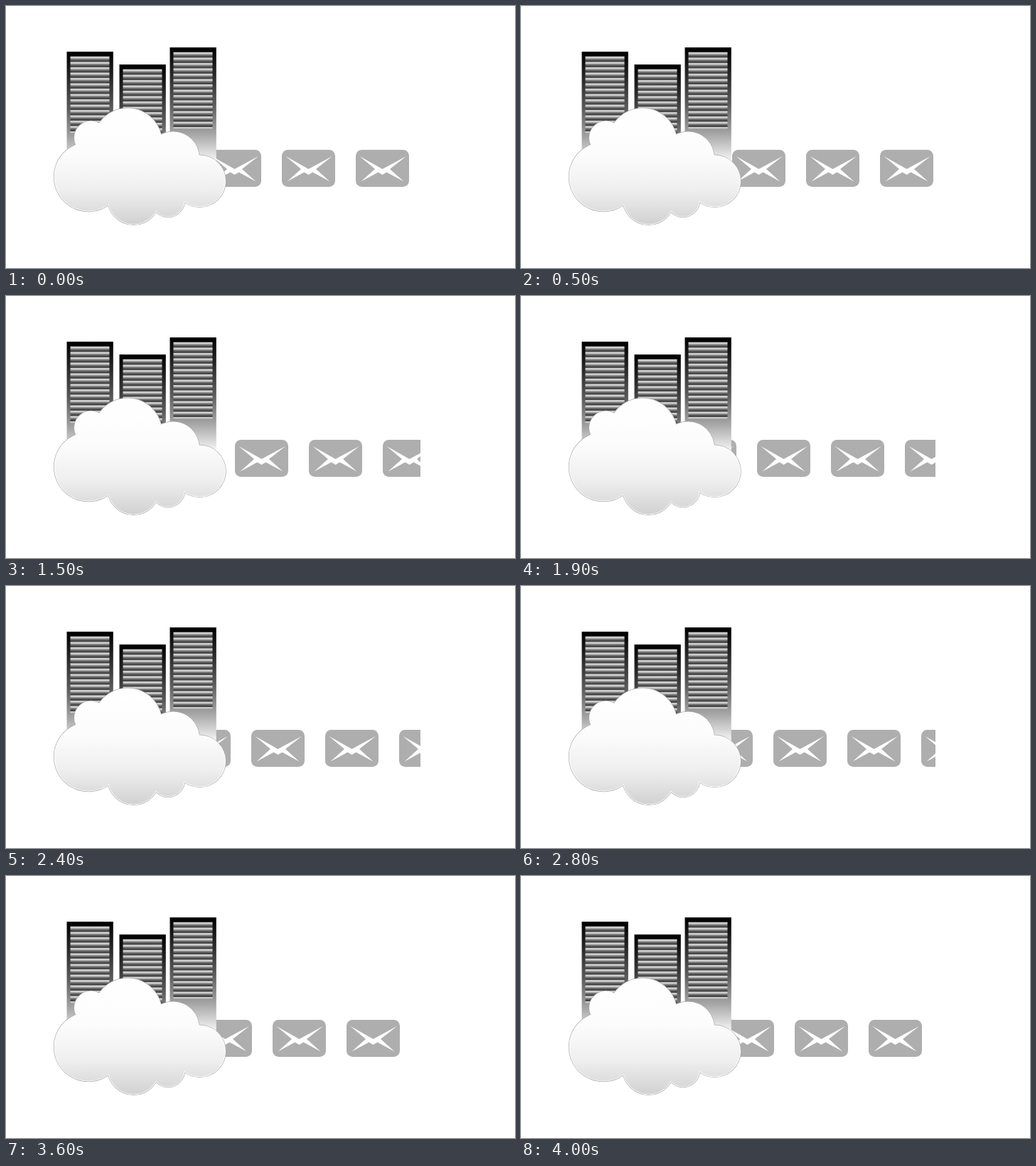
An HTML page for the animation above (4.1 s loop, 716 px wide and 368 px high).

```html
<!DOCTYPE html>
<html lang="en">
<head>
<meta charset="utf-8">
<title>Cloud mail</title>
<style>
  html, body { margin: 0; width: 100%; height: 100%; overflow: hidden; background: #fff; }
  svg { display: block; }
</style>
</head>
<body>
<svg width="716" height="368" viewBox="0 0 716 368">
  <defs>
    <linearGradient id="rackFill" x1="0" y1="0" x2="0" y2="1">
      <stop offset="0" stop-color="#000"/>
      <stop offset=".2" stop-color="#222"/>
      <stop offset=".5" stop-color="#5c5c5c"/>
      <stop offset=".75" stop-color="#a6a6a6"/>
      <stop offset="1" stop-color="#fcfcfc"/>
    </linearGradient>
    <linearGradient id="slats" gradientUnits="userSpaceOnUse" spreadMethod="repeat" x1="0" y1="6.4" x2="0" y2="13.9">
      <stop offset="0" stop-color="#3a3a3a"/>
      <stop offset=".16" stop-color="#d4d4d4"/>
      <stop offset=".36" stop-color="#cacaca"/>
      <stop offset=".56" stop-color="#7c7c7c"/>
      <stop offset=".85" stop-color="#4a4a4a"/>
      <stop offset="1" stop-color="#3a3a3a"/>
    </linearGradient>
    <linearGradient id="cloudFill" gradientUnits="userSpaceOnUse" x1="0" y1="143" x2="0" y2="308">
      <stop offset="0" stop-color="#fff"/>
      <stop offset=".4" stop-color="#fcfcfc"/>
      <stop offset=".7" stop-color="#efefef"/>
      <stop offset="1" stop-color="#d0d0d0"/>
    </linearGradient>
    <clipPath id="lane"><rect x="270" y="200" width="313" height="56"/></clipPath>
    <g id="mail">
      <rect width="75" height="52" rx="8.5" fill="#aeaeae"/>
      <path fill="#fff" d="M5.5 9 37.5 27 71 9 48 27 67.5 44.5 43.5 31.5 37.5 35 31.5 31.5 7.5 44.5 27 27Z"/>
    </g>
  </defs>
  <g clip-path="url(#lane)">
    <g id="mails">
      <use href="#mail" x="-104"/>
      <use href="#mail"/>
      <use href="#mail" x="104"/>
      <use href="#mail" x="208"/>
      <use href="#mail" x="312"/>
    </g>
  </g>
  <g id="racks"></g>
  <g id="cloud"></g>
</svg>
<script>
  const NS = 'http://www.w3.org/2000/svg';
  const $ = id => document.getElementById(id);

  function add(parent, tag, attrs) {
    const el = document.createElementNS(NS, tag);
    for (const k in attrs) el.setAttribute(k, attrs[k]);
    return parent.appendChild(el);
  }

  function rack(x, y) {
    const g = add($('racks'), 'g', { transform: `translate(${x} ${y})` });
    add(g, 'rect', { x: .5, y: .2, width: 65.3, height: 162, fill: 'url(#rackFill)' });
    add(g, 'rect', { x: 5.5, y: 6.4, width: 55, height: 108, fill: 'url(#slats)' });
  }
  rack(85, 64);
  rack(159, 82);
  rack(230, 58);

  const puffs = [
    [116, 240, 49], [119.5, 185, 24], [171, 192, 49], [235, 213.5, 37.5],
    [272.5, 246, 37], [228, 273, 24], [179.5, 270.5, 37.3]
  ];

  function cloudLayer(grow, fill) {
    const g = add($('cloud'), 'g', { fill });
    for (const [cx, cy, r] of puffs) add(g, 'circle', { cx, cy, r: r + grow });
    add(g, 'rect', { x: 116, y: 194, width: 126, height: 78 });
  }
  cloudLayer(.2, '#aaa');
  cloudLayer(-.5, '#fff');
  cloudLayer(-1.4, 'url(#cloudFill)');

  // The row advances one spacing per loop in 41 whole-pixel steps.
  const LOOP = 4100, STEPS = 41, GAP = 104;
  const start = performance.now();

  function draw(now) {
    const t = Math.max(0, now - start) % LOOP;
    const step = Math.floor(t / LOOP * STEPS);
    const x = 284 + Math.round(step * GAP / STEPS);
    $('mails').setAttribute('transform', `translate(${x} 202)`);
    requestAnimationFrame(draw);
  }
  draw(start);
</script>
</body>
</html>
```
